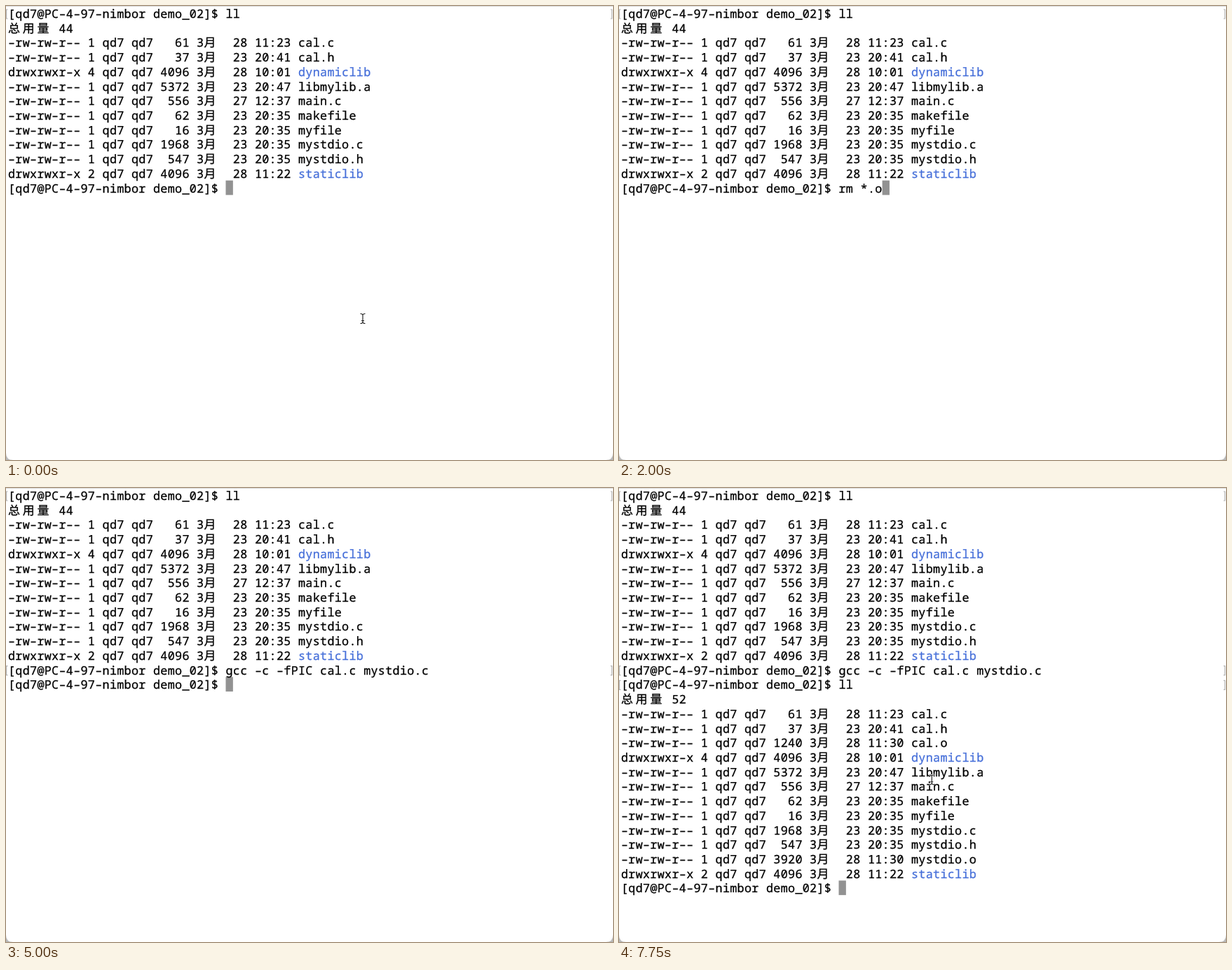
An HTML page for the animation above (8 s loop, 866 px wide and 647 px high).

```html
<!DOCTYPE html>
<html lang="zh">
<head>
<meta charset="utf-8">
<title>Terminal</title>
<style>
  html, body { margin: 0; width: 100%; height: 100%; overflow: hidden; background: #fff; }
  svg { display: block; width: 866px; height: 647px; }
  text {
    font: 500 16.75px "Noto Sans Mono", "DejaVu Sans Mono", monospace;
    letter-spacing: .3px;
    white-space: pre;
    text-rendering: geometricPrecision;
    fill: #000;
    stroke: #000;
    stroke-width: .3;
  }
  .han {
    font: 400 17px "Noto Sans CJK SC", "Noto Sans CJK", "Noto Sans CJK JP", sans-serif;
    letter-spacing: 3.7px;
  }
  .dir { fill: #466fd9; stroke: #466fd9; }
  .mark { fill: none; stroke: #b4b4b4; stroke-width: 1.2; }
  .beam path { fill: none; stroke: #222; stroke-width: 1.15; }
  .beam .halo { stroke: #fff; stroke-width: 2.6; }
</style>
</head>
<body>
<svg viewBox="0 0 866 647">
  <rect width="866" height="647" fill="#fff"/>
  <rect width="866" height="1" fill="#dcdcdc"/>
  <path d="M0 637Q0 647 10 647H0ZM866 637Q866 647 856 647H866Z" fill="#b8b8b8"/>
  <rect id="caret" width="10.35" height="20.7" fill="#929292"/>
  <g id="screen"></g>
  <g id="beam" class="beam"></g>
</svg>
<script>
const LOOP = 8000, LEFT = 3, COL = 10.35, ROW = 20.72, BASELINE = 17;
const USER = 'qd7';
const PROMPT = `[${USER}@PC-4-97-nimbor demo_02]$ `;
const COMPILE = 'gcc -c -fPIC cal.c mystdio.c';
const BEFORE = [
  '61 28 11:23 cal.c',
  '37 23 20:41 cal.h',
  '4096 28 10:01 dynamiclib 4',
  '5372 23 20:47 libmylib.a',
  '556 27 12:37 main.c',
  '62 23 20:35 makefile',
  '16 23 20:35 myfile',
  '1968 23 20:35 mystdio.c',
  '547 23 20:35 mystdio.h',
  '4096 28 11:22 staticlib 2'
];
const AFTER = [...BEFORE];
AFTER.splice(2, 0, '1240 28 11:30 cal.o');
AFTER.splice(10, 0, '3920 28 11:30 mystdio.o');

// Text recalled or typed at the first prompt.
const HISTORY = [[0, ''], [1000, 'll'], [1250, 'clear'], [1500, 'll'],
                 [2000, 'rm *.o'], [2500, 'll'], [2750, COMPILE]];
// Pointer positions; null while hidden.
const POINTER = [[0, [509, 445.5]], [750, null], [7250, [505, 481.5]],
                 [7500, [463, 514]], [7750, [446.3, 415.8]]];

const byId = id => document.getElementById(id);
const at = (steps, t) => steps.filter(([start]) => start <= t).pop()[1];

// The terminal draws its hyphens as wide as a dash.
const put = (col, row, str, cls = '') =>
  `<text x="${LEFT + col * COL}" y="${row * ROW + BASELINE}" class="${cls}">${str.replace(/-/g, '–')}</text>`;

function marks(row) {
  const y = row * ROW + 5;
  return `<path class="mark" d="M2.5 ${y}H.6v13H2.5M862.5 ${y}h2v13h-2"/>`;
}

const command = (row, str, marked) =>
  put(0, row, PROMPT + str) + (marked ? marks(row) : '');

function listing(row, total, files) {
  const lines = files.map((file, i) => {
    const [size, day, time, name, links] = file.split(' ');
    const y = row + 1 + i;
    const mode = links ? 'drwxrwxr-x' : '-rw-rw-r--';
    return put(0, y, `${mode} ${links || 1} ${USER} ${USER} ${size.padStart(4)} 3`)
      + put(27, y, '月', 'han')
      + put(31, y, `${day} ${time}`)
      + put(40, y, name, links ? 'dir' : '');
  });
  return put(0, row, '总用量', 'han') + put(7, row, String(total)) + lines.join('');
}

function drawScreen(t) {
  const input = at(HISTORY, t);
  let html = command(0, 'll', true) + listing(1, 44, BEFORE) + command(12, input, t >= 4750);
  let caret = [PROMPT.length + input.length, 12];
  if (t >= 4750) caret = [0, 13];
  if (t >= 5000) {
    const typed = t >= 6000 ? 'll' : '';
    html += command(13, typed, t >= 6250);
    caret = [PROMPT.length + typed.length, 13];
  }
  if (t >= 6500) {
    html += listing(14, 52, AFTER) + command(27, '', false);
    caret = [PROMPT.length, 27];
  }
  byId('screen').innerHTML = html;
  byId('caret').setAttribute('x', LEFT + caret[0] * COL);
  byId('caret').setAttribute('y', caret[1] * ROW);
}

function drawPointer(t) {
  const spot = at(POINTER, t);
  const shape = 'M-3.5 -7Q0 -7 0 -4.5Q0 -7 3.5 -7M0 -4.5V4.5M-3.5 7Q0 7 0 4.5Q0 7 3.5 7M-2 3H2';
  byId('beam').innerHTML = spot
    ? `<g transform="translate(${spot})"><path class="halo" d="${shape}"/><path d="${shape}"/></g>`
    : '';
}

let shown = -1;
function frame() {
  const t = Math.floor(performance.now() % LOOP / 250) * 250;
  if (t !== shown) {
    drawScreen(t);
    drawPointer(t);
    shown = t;
  }
  requestAnimationFrame(frame);
}
frame();
</script>
</body>
</html>
```
